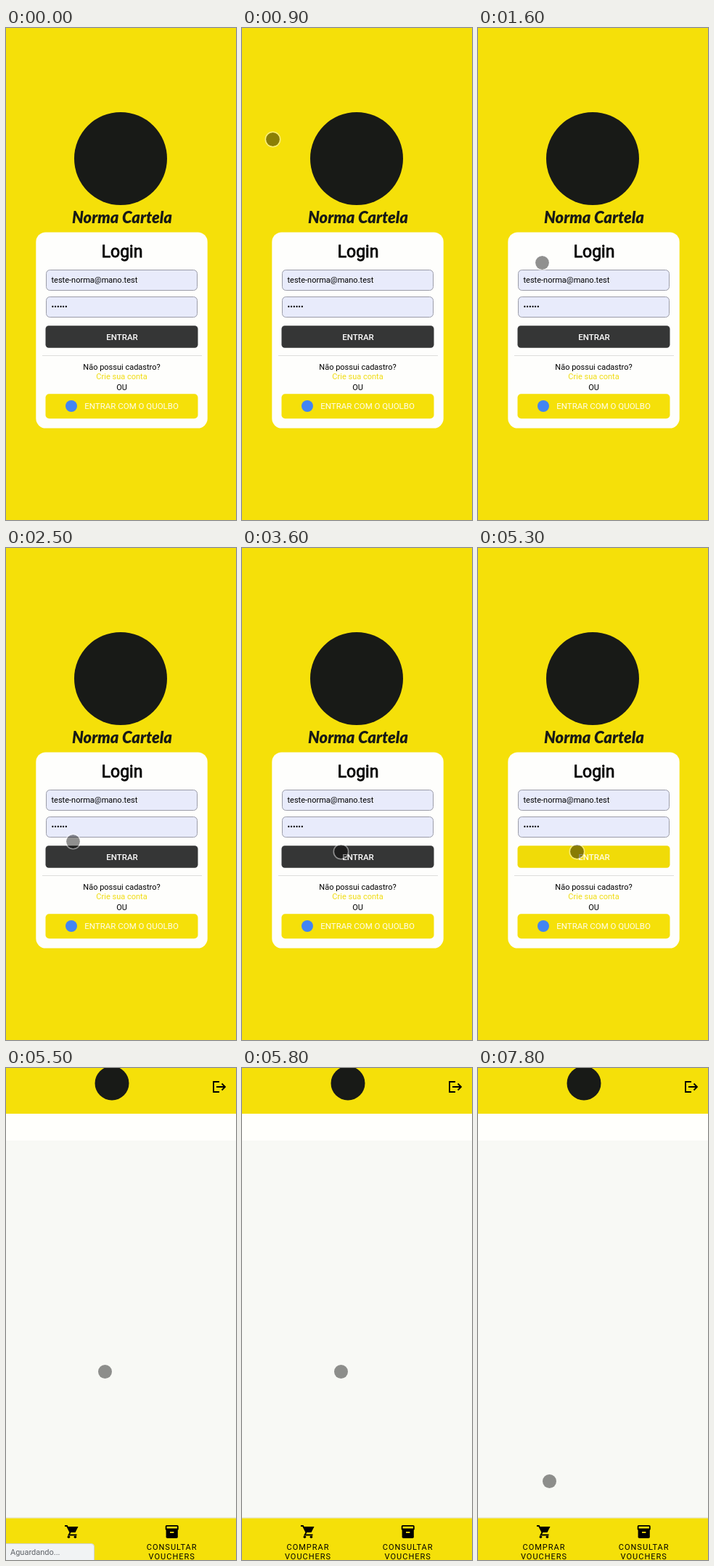
An HTML page that plays this animation: 317 px wide and 678 px high, repeating every 8 s.

```html
<!DOCTYPE html>
<html lang="pt-BR">
<head>
<meta charset="utf-8">
<title>Login</title>
<style>
html, body { margin: 0; width: 100%; height: 100%; overflow: hidden; background: #f5e009; }
svg { display: block; width: 100%; height: 100%; }
text { font-family: Roboto, "Liberation Sans", sans-serif; font-size: 11px; }
.mid text, text.mid { text-anchor: middle; }
.title { font-size: 23px; stroke: #000; stroke-width: .8px; }
.brand { font: italic 900 22px Lato, sans-serif; }
.btn { font-size: 11.5px; }
.field { fill: #e8ebfb; stroke: #9b9ca8; }
.nav text { letter-spacing: 1px; }
.ink { fill: #181a17; }
.sun { fill: #f5e009; }
.line { fill: none; stroke: #000; stroke-width: 1.8; }
</style>
</head>
<body>
<svg viewBox="0 0 317 678">
  <g id="login">
    <rect class="sun" width="317" height="678"/>
    <circle class="ink" cx="158" cy="180" r="64"/>
    <text class="brand ink mid" x="160" y="269">Norma Cartela</text>
    <rect x="41.3" y="281.4" width="236.4" height="270.2" rx="13.5" fill="#fefefc"/>
    <text class="title mid" x="160" y="316">Login</text>
    <rect class="field" x="55.5" y="333.5" width="208" height="28" rx="5"/>
    <text x="62.5" y="351">teste-norma@mano.test</text>
    <rect class="field" x="55.5" y="370.5" width="208" height="28" rx="5"/>
    <text x="62.5" y="388">••••••</text>
    <rect id="enter" x="54.5" y="410.2" width="210" height="30.6" rx="4.5"/>
    <text id="label" class="btn mid" x="160" y="430" font-weight="500">ENTRAR</text>
    <path d="M50 451.5H270" stroke="#dededc"/>
    <g class="mid">
      <text x="159.5" y="471">Não possui cadastro?</text>
      <text x="159.5" y="484" fill="#f0dc10">Crie sua conta</text>
      <text x="159.5" y="499">OU</text>
    </g>
    <rect class="sun" x="54.5" y="504.2" width="210" height="34" rx="5"/>
    <circle cx="90" cy="521" r="8" fill="#4285f4"/>
    <text class="btn" x="108.3" y="525" fill="#fffef0">ENTRAR COM O QUOLBO</text>
  </g>

  <g id="home">
    <rect width="317" height="678" fill="#f8f9f5"/>
    <rect y="63" width="317" height="37" fill="#fffffc"/>
    <rect class="sun" width="317" height="63"/>
    <circle class="ink" cx="146" cy="21" r="23.5"/>
    <path class="line" d="M294 19H286V33H294M290 26H302M297.5 21.5L302 26L297.5 30.5"/>
    <rect y="619.5" width="317" height="1" fill="#dcdcc8"/>
    <rect class="sun" y="620.5" width="317" height="58"/>
    <g id="cart">
      <path class="line" d="M81 631H84L88.5 640L86.5 643.5H97.5"/>
      <path d="M84.5 632H99.5L95.5 640H88Z"/>
      <circle cx="86.4" cy="646.3" r="1.8"/>
      <circle cx="95.4" cy="646.3" r="1.8"/>
    </g>
    <g id="box">
      <rect x="219.7" y="630" width="18" height="7" rx="1.8"/>
      <rect x="220.6" y="635" width="16.2" height="13" rx="1.8"/>
      <rect class="sun" x="221.5" y="631.8" width="14.4" height="2.7"/>
      <rect class="sun" x="226" y="639" width="5.4" height="1.8"/>
    </g>
    <g class="mid nav">
      <text x="91" y="664">COMPRAR</text>
      <text x="91" y="677">VOUCHERS</text>
      <text x="228.7" y="664">CONSULTAR</text>
      <text x="228.7" y="677">VOUCHERS</text>
    </g>
    <g id="status">
      <rect x="-4" y="655.5" width="125.5" height="28" rx="4" fill="#f1f3f4" stroke="#d0d2d4"/>
      <text x="6" y="671" fill="#5f6368">Aguardando...</text>
    </g>
  </g>

  <g id="cursor">
    <circle r="9.5" fill-opacity=".43"/>
    <circle id="ring" r="10.2" fill="none" stroke="#fff" stroke-opacity=".45" stroke-width="1.6"/>
  </g>
</svg>
<script>
const LOOP = 8000, STEP = 100;
const ENTER = 500, PRESS = 4800, OPEN = 5500;
const $ = id => document.getElementById(id);

// Each glide: start time, number of steps, and where the pointer comes to rest
const glides = [
  [500, 2, 32, 66],
  [800, 2, 42.5, 153.5],
  [1100, 2, 57, 184],
  [1500, 2, 88.5, 323.5],
  [2200, 2, 92, 379],
  [2500, 1, 92.5, 404.5],
  [2600, 3, 104, 418.5],
  [3000, 4, 139, 419],
  [3600, 1, 136.5, 418.5],
  [7600, 3, 98.5, 569.5]
];

const clamp = v => Math.min(1, Math.max(0, v));
const lerp = (a, b, k) => a + (b - a) * k;
const mix = (a, b, k) => `rgb(${a.map((v, i) => Math.round(lerp(v, b[i], k)))})`;
const show = (id, on) => $(id).setAttribute("visibility", on ? "visible" : "hidden");

function pointer(t) {
  let x = 42, y = -24;
  for (const [start, steps, toX, toY] of glides) {
    const k = clamp(((t - start) / STEP + 1) / steps);
    x = lerp(x, toX, k);
    y = lerp(y, toY, k);
  }
  return `translate(${x} ${y})`;
}

function draw(ms) {
  const t = Math.floor(ms / STEP) * STEP;
  const open = t >= OPEN;
  show("login", !open);
  show("home", open);

  show("cursor", t >= ENTER);
  show("ring", t >= ENTER && !open);
  $("cursor").setAttribute("transform", pointer(t));

  const pressed = t >= PRESS;
  const k = clamp((t - PRESS) / 500);
  $("enter").setAttribute("fill", pressed ? mix([66, 98, 115], [240, 219, 8], k) : "#353636");
  $("label").setAttribute("fill", pressed ? mix([190, 210, 222], [255, 252, 225], k) : "#fff");

  show("status", open && t < OPEN + 300);
  $("status").setAttribute("opacity", t < OPEN + 200 ? 1 : 0.5);
}

const start = performance.now();
function tick() {
  draw((performance.now() - start) % LOOP);
  requestAnimationFrame(tick);
}
tick();
</script>
</body>
</html>
```
